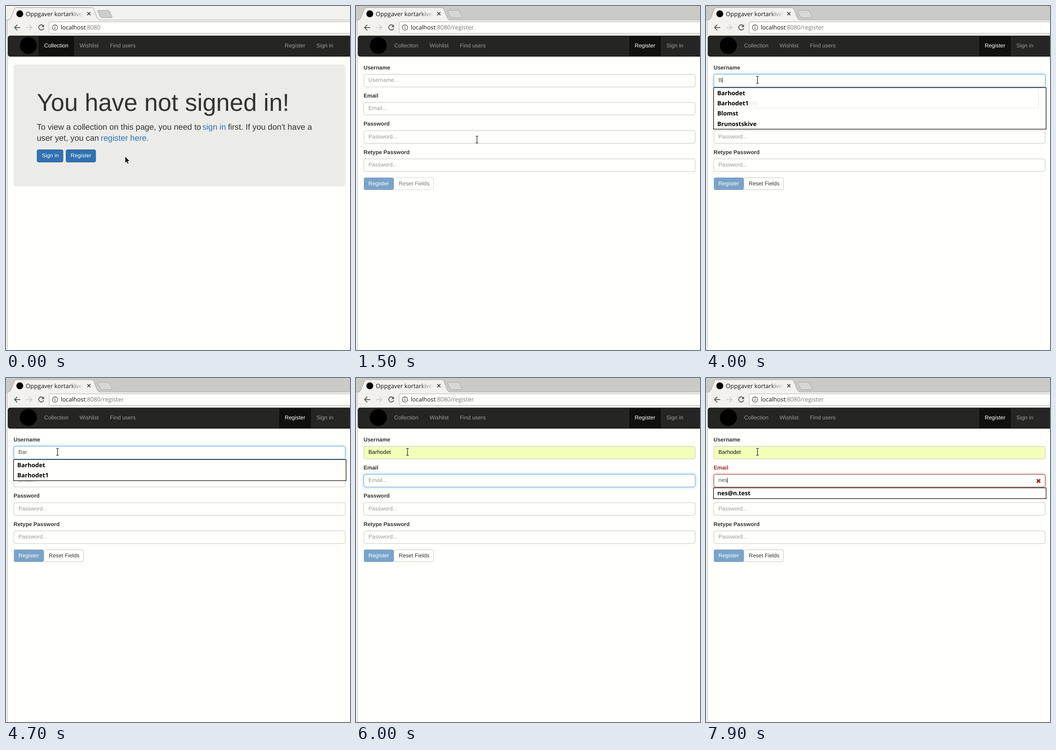
An HTML page for the animation above (8 s loop, 748 by 748 pixels).

```html
<!DOCTYPE html>
<html lang="en">
<head>
<meta charset="utf-8">
<title>Register</title>
<style>
html, body { margin: 0; width: 100%; height: 100%; overflow: hidden; background: #fffffb; }
svg { display: block; width: 100vw; height: 100vh; }
text { font: 12px "Liberation Sans", Arial, sans-serif; text-rendering: geometricPrecision; white-space: pre; }
.ui { font: 12.9px "Open Sans", "Noto Sans", sans-serif; }
.item { font: bold 13px "Open Sans", "Noto Sans", sans-serif; }
.h1 { font-size: 53px; }
.lead { font-size: 17.75px; }
.label { font-weight: bold; }
</style>
</head>
<body>
<svg viewBox="0 0 748 748" xmlns="http://www.w3.org/2000/svg">
  <defs>
    <linearGradient id="fade" gradientUnits="userSpaceOnUse" x1="138" x2="169" y1="0" y2="0">
      <stop offset="0" stop-color="#111"/><stop offset="1" stop-color="#111" stop-opacity="0"/>
    </linearGradient>
  </defs>
  <rect width="748" height="748" fill="#fffffb"/>

  <g id="browser">
    <rect id="strip" width="748" height="31"/>
    <rect y="30" width="748" height="34" fill="#f2f1ee"/>
    <path d="M0 30.5H748" stroke="#b0afac"/>
    <path d="M4 31Q9 30 10.500 26L18 7Q19.500 3.500 23 3.500H186Q189.500 3.500 191 7L198 25Q200 30 205 31Z" fill="#f2f1ee"/>
    <path d="M4 30.500Q9 30 10.500 26L18 7Q19.500 3.500 23 3.500H186Q189.500 3.500 191 7L198 25Q200 30 205 30.500" fill="none" stroke="#a3a29f"/>
    <path id="plus" d="M201 9.500H222Q224.500 9.500 225.500 12L230.500 23Q231 25.500 229 25.500H208.500Q206 25.500 205 23L199.500 12Q199 9.500 201 9.500Z" stroke="#a6a5a2"/>
    <circle cx="30" cy="17" r="7.500" fill="#000"/>
    <text class="ui" x="43" y="21.500" fill="url(#fade)">Oppgaver kortarkivet</text>
    <path d="M176.800 13.300l6.800 6.800m0-6.800l-6.800 6.800" stroke="#333" stroke-width="1.600"/>
    <rect x="94" y="34.500" width="670" height="25" rx="2" fill="#fffffb" stroke="#b3b2af"/>
    <g fill="none" stroke="#555553" stroke-width="1.800">
      <path d="M31 46.800H19M24.500 40.800L18.500 46.800L24.500 52.800"/>
      <path d="M44 46.800H56M50.500 40.800L56.500 46.800L50.500 52.800" stroke="#cfcecb"/>
      <path d="M81 43A5.600 5.600 0 1 0 82 48.500"/>
      <path d="M82.600 40.500V46H77Z" fill="#555553" stroke="none"/>
      <circle cx="106.500" cy="46.800" r="5.800" stroke-width="1.300"/>
      <path d="M106.500 45.800V50M106.500 43.200V44.700" stroke-width="1.500"/>
    </g>
    <text class="ui" x="119" y="51" fill="#111">localhost</text>
    <text class="ui" x="172.500" y="51" fill="#777775">:8080</text>
    <text id="path" class="ui" x="205.500" y="51" fill="#777775">/register</text>
    <path d="M2.500 31V748" stroke="#a9a8a5"/>
  </g>

  <g id="nav">
    <rect x="4.500" y="65" width="760" height="44.500" rx="4" fill="#252623" stroke="#0b0c0a"/>
    <rect id="active" y="66" height="42.500" fill="#10110e"/>
    <circle cx="48.500" cy="86" r="18.500" fill="#000"/>
  </g>

  <g id="home">
    <rect x="17" y="127" width="720.500" height="265.500" rx="5" fill="#ebebe8"/>
    <g fill="#333432">
      <text class="h1" x="67" y="228">You have not signed in!</text>
      <text class="lead" x="67" y="268.500">To view a collection on this page, you need to </text>
      <text class="lead" x="427" y="268.500" fill="#3272b2">sign in</text>
      <text class="lead" x="482.500" y="268.500">first. If you don't have a</text>
      <text class="lead" x="67" y="292.500">user yet, you can </text>
      <text id="link" class="lead" x="206" y="292.500">register here.</text>
    </g>
    <path id="under" d="M206.500 295H310" stroke="#23527c" stroke-width="1.200"/>
    <g fill="#3071b0" stroke="#2b669f">
      <rect x="67.500" y="312.500" width="56.500" height="27" rx="3.500"/>
      <rect x="130.500" y="312.500" width="64.500" height="27" rx="3.500"/>
    </g>
    <g fill="#fffffb">
      <text x="78" y="328.500">Sign in</text>
      <text x="140.500" y="328.500">Register</text>
    </g>
  </g>

  <g id="form">
    <g id="fields"></g>
    <rect x="17" y="373" width="65" height="27" rx="3.500" fill="#79a3ca"/>
    <text x="27" y="389.500" fill="#fffffb">Register</text>
    <g id="reset">
      <rect x="82.500" y="373.500" width="86" height="26" rx="3.500" fill="#fffffb" stroke="#c6c6c3"/>
      <text x="93" y="389.500" fill="#333">Reset Fields</text>
    </g>
    <path id="cross" d="M719.300 220.300l7.400 7.400m0-7.400l-7.400 7.400" stroke="#9c2b35" stroke-width="3.200"/>
    <path id="caret" stroke="#222"/>
    <g id="popup"></g>
    <g id="ghost"></g>
  </g>

  <g id="cursor">
    <path id="arrow" d="M0 0V14.500L3.300 11.500L5.600 16.500L8 15.400L5.700 10.600H10Z" fill="#000" stroke="#fff" stroke-width=".8"/>
    <path id="hand" d="M-1.300 1Q0-.8 1.200 1V5.200L6 6.200Q7.600 6.800 7.400 9L6.500 14.500H-2L-5 9.500Q-4.800 7.600-2.800 8.800L-1.300 9.800Z" fill="#000" stroke="#fff" stroke-width=".8"/>
    <g id="beam" fill="none">
      <path d="M-3-7.500H3M0-7.500V7.500M-3 7.500H3" stroke="#fff" stroke-width="2.600" opacity=".7"/>
      <path d="M-3-7.500H-.8L0-6.800L.8-7.500H3M0-7V7M-3 7.500H-.8L0 6.800L.8 7.500H3" stroke="#111" stroke-width="1.200"/>
    </g>
  </g>
</svg>
<script>
const $ = id => document.getElementById(id);
const LOOP = 8000, TICK = 100;
const NS = "http://www.w3.org/2000/svg";

function add(parent, tag, attrs, text) {
  const el = document.createElementNS(NS, tag);
  for (const k in attrs) el.setAttribute(k, attrs[k]);
  if (text) el.textContent = text;
  return parent.appendChild(el);
}
const set = (el, attrs) => { for (const k in attrs) el.setAttribute(k, attrs[k]); };
const show = (el, on) => { el.style.display = on ? "" : "none"; };

const menu = [["Collection", 83], ["Wishlist", 160], ["Find users", 226], ["Register", 606], ["Sign in", 675]]
  .map(([name, x]) => add($("nav"), "text", { x, y: 90 }, name));

const fields = [["Username", "Username...", 148], ["Email", "Email...", 209],
  ["Password", "Password...", 270.5], ["Retype Password", "Password...", 332]]
  .map(([name, hint, y]) => ({
    y, hint,
    label: add($("fields"), "text", { class: "label", x: 16.5, y: y - 10.5, fill: "#333432" }, name),
    box: add($("fields"), "rect", { x: 17, y: y + .5, width: 720.5, height: 27.5, rx: 3.5, fill: "#fffffb", stroke: "#c4c4c1" }),
    text: add($("fields"), "text", { x: 27, y: y + 17, fill: "#999996" }, hint)
  }));

const NAME = "Barhodet";
const two = [NAME, NAME + "1"];
const four = [...two, "Blomst", "Brunostskive"];
const recent = ["Fjell", "FjellredTest"];
const none = [];

// Each step changes some of the state and holds until the next one.
const steps = [
  [0, { focused: false, path: false, page: "home", user: "", mail: "", list: none, at: 0, pick: false, fill: false,
        ghost: none, alpha: 0, scale: 1, glow: [0, 0], caret: -1, reset: false, error: false }],
  [1300, { focused: true }],
  [1400, { path: true }],
  [1500, { page: "form" }],
  [2900, { glow: [.6, 0], caret: 0 }],
  [3000, { glow: [.95, 0], list: recent }],
  [3400, { glow: [1, 0], caret: -1 }],
  [3700, { user: "B", caret: 0, reset: true }],
  [3800, { list: four, ghost: recent, alpha: .35, scale: .985 }],
  [3900, { alpha: .2, scale: .97 }],
  [4000, { alpha: .09, scale: .954 }],
  [4100, { user: "Ba", list: two, ghost: four, alpha: .1, scale: .985 }],
  [4200, { user: "Bar", ghost: two, alpha: .05, scale: .968 }],
  [4400, { alpha: 0 }],
  [4700, { caret: -1 }],
  [5300, { user: NAME, pick: true, fill: true }],
  [5500, { list: none, pick: false, ghost: two, alpha: .3, scale: .985 }],
  [5600, { alpha: .04, scale: .968, glow: [.15, .85], caret: 1 }],
  [5900, { alpha: 0, glow: [0, .95] }],
  [6000, { glow: [0, 1], caret: -1 }],
  [6600, { caret: 1 }],
  [7200, { mail: "n", error: true, at: 1, list: ["nes@n.test"], glow: [0, .7] }],
  [7300, { mail: "ne", glow: [0, .8] }],
  [7400, { mail: "nes", glow: [0, .88] }],
  [7600, { glow: [0, .95] }],
  [7900, { glow: [0, 1] }]
];

function drawList(g, names, at, pick, back) {
  g.replaceChildren();
  if (!names.length) return;
  const y = [177.4, 238.8][at], h = names.length * 22.3 + 1.2;
  add(g, "rect", { x: 16.5, y, width: 723, height: h, fill: back, stroke: "#000", "stroke-width": 1.2 });
  if (pick) add(g, "rect", { x: 17.2, y: y + .7, width: 721.6, height: 22, fill: "#eeeeeb" });
  names.forEach((n, i) => add(g, "text", { class: "item", x: 24.5, y: y + 16.2 + i * 22.4, fill: "#000" }, n));
}

function drawField(i, s) {
  const f = fields[i], value = i ? s.mail : s.user, glow = s.glow[i];
  const bad = i === 1 && s.error, filled = i === 0 && s.fill;
  const tint = bad ? "206,132,131" : "102,175,233";
  f.text.textContent = value || f.hint;
  set(f.text, { fill: filled ? "#111" : value ? "#555553" : "#999996" });
  set(f.label, { fill: bad ? "#9c2b35" : "#333432" });
  set(f.box, {
    fill: filled ? "#f3ffb9" : "#fffffb",
    stroke: bad ? "#8b303a" : glow > .3 ? "#69a6d8" : "#c4c4c1"
  });
  f.box.style.filter = glow ? `drop-shadow(0 0 3px rgba(${tint},${.65 * glow}))` : "none";
}

function pointer(t) {
  if (t < 1500) {
    if (t >= 1000) return ["hand", 264, 290.5];
    const k = Math.min(1, Math.max(0, (t - 400) / 400));
    return [k < 1 ? "arrow" : "hand", 259 + 3 * k, 327 - 34 * k];
  }
  const p = Math.min(1, Math.max(0, (t - 1900) / 900));
  const k = p * p * (3 - 2 * p), x = 263 - 151 * k, y = 290.5 - 130 * k;
  const over = fields.some(f => y >= f.y && y <= f.y + 28);
  return [over ? "beam" : "arrow", x, y];
}

function draw(t) {
  const s = Object.assign({}, ...steps.filter(([at]) => at <= t).map(e => e[1]));
  const form = s.page === "form";
  set($("strip"), { fill: s.focused ? "#cacac6" : "#f2f2ee" });
  set($("plus"), { fill: s.focused ? "#d7d7d3" : "#cecdca" });
  show($("path"), s.path);
  show($("home"), !form);
  show($("form"), form);
  set($("active"), form ? { x: 594, width: 69 } : { x: 71, width: 77 });
  menu.forEach((m, i) => set(m, { fill: i === (form ? 3 : 0) ? "#fffffb" : "#9b9b98" }));

  const [kind, x, y] = pointer(t);
  for (const id of ["arrow", "hand", "beam"]) show($(id), id === kind);
  set($("cursor"), { transform: `translate(${x} ${y})` });
  const hover = kind === "hand";
  set($("link"), { fill: hover ? "#23527c" : "#3272b2" });
  show($("under"), hover);
  if (!form) return;

  drawField(0, s);
  drawField(1, s);
  set($("reset"), { opacity: s.reset ? 1 : .65 });
  show($("cross"), s.error);
  show($("caret"), s.caret >= 0);
  if (s.caret >= 0) {
    const f = fields[s.caret], typed = s.caret ? s.mail : s.user;
    const cx = Math.floor(27 + (typed ? f.text.getComputedTextLength() : 0)) + .5;
    set($("caret"), { d: `M${cx} ${f.y + 8}v11.500` });
  }
  drawList($("popup"), s.list, s.at, s.pick, "#fffffb");
  drawList($("ghost"), s.alpha ? s.ghost : none, 0, false, "none");
  const mid = 177.4 + s.ghost.length * 11.15 + .6;
  set($("ghost"), {
    opacity: s.alpha,
    transform: `translate(378 ${mid}) scale(${s.scale}) translate(-378 ${-mid})`
  });
}

const start = performance.now();
let last = -1;
function frame() {
  const t = Math.floor((performance.now() - start) % LOOP / TICK) * TICK;
  if (t !== last) draw(last = t);
  requestAnimationFrame(frame);
}
frame();
</script>
</body>
</html>
```
